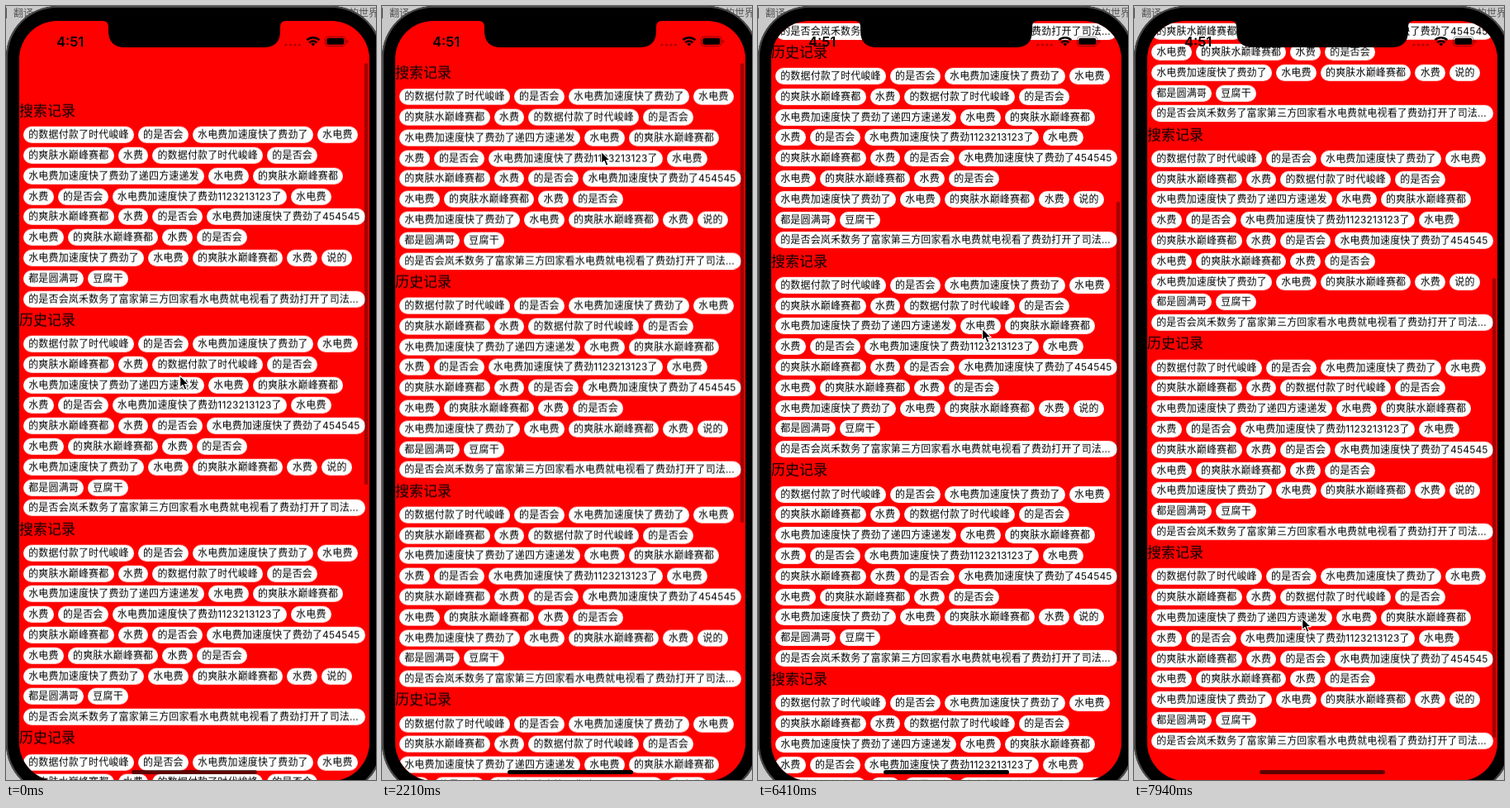
Recreate the animation shown at these times as an HTML page. Size 448 by 936 pixels, loop 7990 ms.

```html
<!DOCTYPE html>
<html lang="zh-CN">
<head>
<meta charset="utf-8">
<title>搜索记录</title>
<style>
html, body { margin: 0; width: 100%; height: 100%; overflow: hidden; }
body {
  position: relative; background: #c9c9c9; color: #000;
  font: 12px/20px Inter, "Noto Sans CJK SC", "Noto Sans CJK", sans-serif;
}
body * { position: absolute; box-sizing: border-box; white-space: nowrap; }
.back { top: -1px; color: #555; }
.phone {
  left: 0; top: 0; width: 456px; height: 954px; border-radius: 62px;
  background: #000; box-shadow: inset 0 0 0 2px #4b4b4b;
}
.screen {
  left: 16px; top: 18px; width: 424px; height: 919px; border-radius: 46px;
  background: #fe0000; overflow: hidden;
}
.list { left: 0; top: 0; will-change: transform; }
.head { left: 0; font-size: 17px; line-height: 24px; }
.row { left: 5px; display: flex; gap: 5px; }
.row span {
  position: static; flex: none; height: 20px; padding: 0 6.2px;
  border-radius: 10px; background: #fff; letter-spacing: .15px;
}
.row .wide { width: 414px; overflow: hidden; }
.bar { left: 418px; top: 0; width: 3.5px; border-radius: 2px; background: rgba(0, 0, 0, .36); }
.home { left: 136px; top: 906px; width: 152px; height: 5px; border-radius: 3px; background: #000; }
.clock { left: 61px; top: 33px; font-size: 16.5px; font-weight: 600; }
svg { left: 0; top: 0; overflow: visible; }
</style>
</head>
<body>
<div class="back" style="left:9px">翻译</div>
<div class="back" style="left:415px">的世界</div>
<div class="back" style="left:0;top:2px;width:1px;height:13px;background:#555"></div>
<div class="phone">
  <div class="screen">
    <div class="list"></div>
    <div class="bar"></div>
    <div class="home"></div>
  </div>
</div>
<svg width="448" height="60">
  <path d="M117 17H339V18Q332 18 332 25V30Q332 50 312 50H144Q124 50 124 30V25Q124 18 117 18Z"/>
  <g fill="#000" fill-opacity=".3">
    <circle cx="339" cy="47" r="1.6"/><circle cx="344.5" cy="47" r="1.6"/>
    <circle cx="350" cy="47" r="1.6"/><circle cx="355.5" cy="47" r="1.6"/>
  </g>
  <g fill="none" stroke="#000" stroke-width="2.4">
    <path d="M364.3 41.2A11 11 0 0 1 379.3 41.2M367.2 44.3A6.8 6.8 0 0 1 376.4 44.3"/>
  </g>
  <path d="M371.8 48.6L369.3 46A3.6 3.6 0 0 1 374.3 46Z"/>
  <rect x="386.5" y="37" width="24.5" height="11.5" rx="3.4" fill="none" stroke="#000" stroke-opacity=".4"/>
  <rect x="388.3" y="38.8" width="21" height="8" rx="2"/>
  <path d="M412.4 40.8Q414.2 41.4 414.2 42.8T412.4 44.8Z" fill-opacity=".45"/>
</svg>
<div class="clock">4:51</div>
<svg class="cursor" width="14" height="20">
  <path d="M.7 1.2V15.6L4 12.5L6.3 18.2L8.9 17.1L6.6 11.6H11.2Z" stroke="#fff" stroke-width="1.1" stroke-linejoin="round"/>
</svg>
<script>
const LOOP = 7990, PITCH = 252.8, MAX = 430.8, RATIO = .6035;
const $ = s => document.querySelector(s);
const list = $('.list'), bar = $('.bar'), home = $('.home'), cursor = $('.cursor');

const fee = '水电费', water = '水费', yes = '的是否会';
const speed = '水电费加速度快了费劲', peak = '的爽肤水巅峰赛都', data = '的数据付款了时代峻峰';
const rows = [
  [data, yes, speed + '了', fee],
  [peak, water, data, yes],
  [speed + '了递四方速递发', fee, peak],
  [water, yes, speed + '1123213123了', fee],
  [peak, water, yes, speed + '了454545'],
  [fee, peak, water, yes],
  [speed + '了', fee, peak, water, '说的'],
  ['都是圆满哥', '豆腐干'],
  ['的是否会岚禾数务了富家第三方回家看水电费就电视看了费劲打开了司法...']
];

function add(parent, tag, cls, text, top) {
  const el = document.createElement(tag);
  el.className = cls;
  el.textContent = text;
  if (top !== undefined) el.style.top = top + 'px';
  return parent.appendChild(el);
}

for (let s = 0; s < 5; s++) {
  const top = s * PITCH;
  add(list, 'div', 'head', s % 2 ? '历史记录' : '搜索记录', top);
  rows.forEach((words, i) => {
    const row = add(list, 'div', 'row', '', top + 31.1 + i * 24.8);
    words.forEach(w => add(row, 'span', i === 8 ? 'wide' : '', w));
  });
}

// Pointer moves: start, end, x, y
const moves = [
  [30, 280, 136, 123], [280, 480, 97, 107], [1050, 1280, 211, 108],
  [1640, 1810, 274, 108], [1990, 2210, 265, 175], [2340, 2560, 262, 221],
  [2810, 3040, 256, 253], [3230, 3510, 199.5, 254], [3700, 3930, 181, 325],
  [4050, 4220, 198, 312], [4400, 4630, 179, 411], [4820, 4930, 181, 443],
  [5180, 5250, 205.5, 441], [5600, 5940, 178, 656], [6070, 6410, 271, 389],
  [6410, 6710, 260, 515], [6710, 7120, 208, 690], [7720, 7940, 203, 739]
];
const path = [[0, 210, 446]];
for (const [from, to, x, y] of moves) {
  const last = path[path.length - 1];
  if (from > last[0]) path.push([from, last[1], last[2]]);
  path.push([to, x, y]);
}

// Drag, fling and rebound at the end of the list: time, offset
const fling = [
  [6080, 0], [6250, 115], [6410, 276.8], [6560, 405], [6640, 440],
  [6700, 447], [6800, 443], [6950, 436], [7200, 432], [7650, MAX]
];

// Monotone cubic through the points, flat at rests and turns
function curve(pts, t, k) {
  const n = pts.length - 1;
  if (t <= pts[0][0]) return pts[0][k];
  if (t >= pts[n][0]) return pts[n][k];
  let i = 0;
  while (t >= pts[i + 1][0]) i++;
  const slope = j => j < 0 || j >= n ? 0 : (pts[j + 1][k] - pts[j][k]) / (pts[j + 1][0] - pts[j][0]);
  const tangent = j => {
    const a = slope(j - 1), b = slope(j);
    return a * b > 0 ? 2 * a * b / (a + b) : 0;
  };
  const h = pts[i + 1][0] - pts[i][0], u = (t - pts[i][0]) / h, v = 1 - u;
  return pts[i][k] * (1 + 2 * u) * v * v + pts[i + 1][k] * u * u * (3 - 2 * u)
    + h * u * v * (tangent(i) * v - tangent(i + 1) * u);
}

const clamp = (v, a, b) => Math.min(b, Math.max(a, v));

function draw(t) {
  const offset = t < 1000 ? -46.5 * Math.exp(-.00764 * t) : curve(fling, t, 1);
  const inside = clamp(offset, 0, MAX), over = offset - inside;
  list.style.transform = `translateY(${50.5 - offset}px)`;
  bar.style.height = 556 - Math.abs(over) + 'px';
  bar.style.transform = `translateY(${51 + inside * RATIO + Math.max(0, over)}px)`;
  home.style.opacity = t < 3000 ? clamp(.62 + (t - 50) / 400, .62, 1) : clamp(1 - (t - 6480) / 400, .62, 1);
  cursor.style.transform = `translate(${curve(path, t, 1)}px, ${curve(path, t, 2)}px)`;
}

const start = performance.now();
function tick() {
  draw((performance.now() - start) % LOOP);
  requestAnimationFrame(tick);
}
tick();
</script>
</body>
</html>
```
